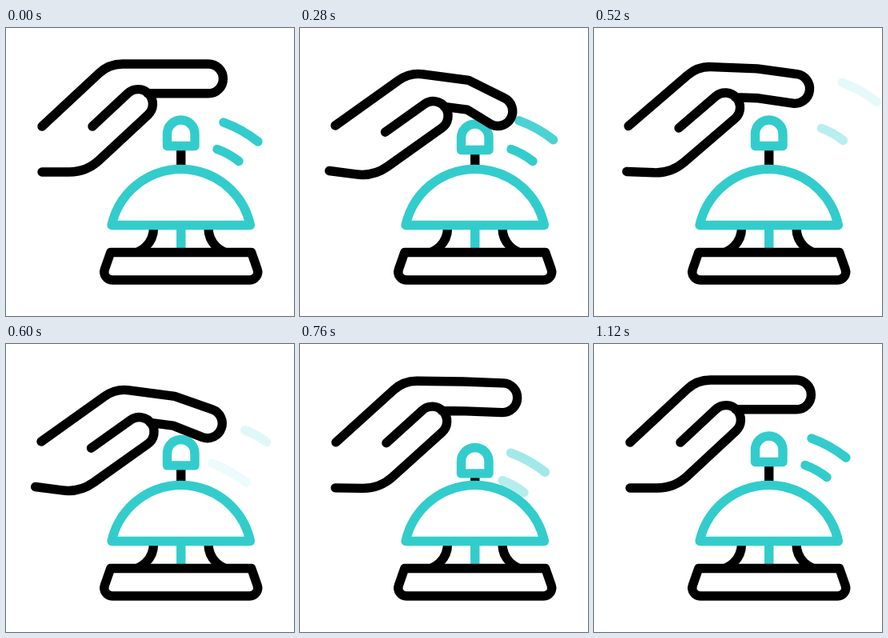
These frames come from a looping animation (360 by 360 pixels, 1.48 s). An HTML page with a canvas:

```html
<!DOCTYPE html>
<html lang="en">
<head>
<meta charset="utf-8">
<title>Reception bell</title>
<style>
  html, body { margin: 0; width: 100%; height: 100%; overflow: hidden; background: #fff; }
  canvas { display: block; width: 100vw; height: 100vh; }
</style>
</head>
<body>
<canvas id="stage" width="360" height="360"></canvas>
<script>
const LOOP = 1480, STEP = 40, START = 120, SPAN = 1000;
const TEAL = '#33cccc', BLACK = '#000', MID = 218.75;
const ctx = document.getElementById('stage').getContext('2d');

const rad = deg => deg * Math.PI / 180;
const clamp = v => Math.min(1, Math.max(0, v));
const part = (u, a, b) => clamp((u - a) / (b - a));
const smooth = s => s * s * (3 - 2 * s);
const lerp = (a, b, s) => a + (b - a) * s;

function shape(color, trace, { cap = 'butt', fill = false } = {}) {
  ctx.beginPath();
  trace();
  ctx.strokeStyle = color;
  ctx.lineCap = cap;
  if (fill) ctx.fill();
  ctx.stroke();
}

const line = (color, x, y1, y2) => shape(color, () => {
  ctx.moveTo(x, y1);
  ctx.lineTo(x, y2);
});

// Hand poses: turn about the wrist, extra bend of the fingers, wrist shift
const REST = { turn: 0, bend: 0, x: 0, y: 0 };
const PRESS = { turn: 7.5, bend: 19, x: -1, y: -1 };
const LIFT = { turn: -2.9, bend: -1, x: -2.8, y: 0 };
const TAP = { ...PRESS, bend: 12 };
const MOVES = [[0, REST], [.16, PRESS], [.32, LIFT], [.48, TAP], [.68, REST], [1, REST]];

function poseAt(u) {
  const i = Math.max(1, MOVES.findIndex(([end]) => u <= end));
  const [a, from] = MOVES[i - 1], [b, to] = MOVES[i];
  const s = smooth(part(u, a, b));
  return Object.fromEntries(Object.keys(REST).map(k => [k, lerp(from[k], to[k], s)]));
}

// Traced from the wrist, with every slanted edge at the same angle
function hand({ turn, bend, x, y }) {
  const slant = rad(43), thumbStart = -Math.PI / 2 - slant;
  ctx.save();
  ctx.translate(45 + x, 123 + y);
  ctx.rotate(rad(turn));
  shape(BLACK, () => {
    ctx.moveTo(0, 0);
    ctx.arcTo(78 / Math.tan(slant), -78, 158, -78, 43);
    ctx.lineTo(158, -78);
    ctx.save();
    ctx.translate(158, -78);
    ctx.rotate(rad(bend));
    ctx.arc(50, 18.4, 18.4, -Math.PI / 2, Math.PI / 2);
    ctx.restore();
    ctx.lineTo(161, -41.2);
    ctx.lineTo(132, -41.2);

    ctx.moveTo(63, 0);
    ctx.arc(120, -28, 18.4, thumbStart, thumbStart + Math.PI);
    ctx.arcTo(55.6, 57, 0, 57, 55);
    ctx.lineTo(0, 57);
  }, { cap: 'round' });
  ctx.restore();
}

function bell(dip) {
  line(BLACK, MID, 148 + dip, 176);
  shape(TEAL, () => {
    ctx.arc(MID, 132.3 + dip, 17.25, Math.PI, 0);
    ctx.lineTo(MID + 17.25, 147.5 + dip);
    ctx.lineTo(MID - 17.25, 147.5 + dip);
    ctx.closePath();
  }, { fill: true });

  for (const side of [-1, 1]) {
    shape(BLACK, () => ctx.arc(MID + side * 66.75, 250, 32.5,
      side < 0 ? 0 : Math.PI, Math.PI / 2, side > 0));
  }
  // Keep the feet from showing through the base
  line(TEAL, MID, 248, 278);
  shape(TEAL, () => {
    ctx.arc(MID, 265, 88.6, Math.PI + .21, -.21);
    ctx.closePath();
  }, { fill: true });
  shape(BLACK, () => {
    ctx.moveTo(MID - 88, 280.5);
    ctx.lineTo(MID + 88, 280.5);
    ctx.arcTo(MID + 100, 315, MID, 315, 10);
    ctx.arcTo(MID - 100, 315, MID - 88, 280.5, 10);
    ctx.closePath();
  }, { fill: true });
}

// A sound wave flies out and fades, then drifts back in from the bell
const WAVES = [
  { x: 272, y: 118, w: 43, h: 24, out: .12, turn: .44, end: .88, away: [40, -52], back: [-15, 32], fade: 1 },
  { x: 264, y: 151.5, w: 27, h: 15, out: .24, turn: .56, end: 1, away: [41, -52], back: [-12, 21], fade: .6 }
];

function wave({ x, y, w, h, out, turn, end, away, back, fade }, u) {
  const leaving = u < turn;
  const s = leaving ? part(u, out, turn) : part(u, turn, end);
  const k = leaving ? smooth(s) : 1 - smooth(s);
  const [dx, dy] = leaving ? away : back;
  ctx.save();
  ctx.globalAlpha = leaving ? 1 - s ** fade : s ** fade;
  ctx.translate(x + dx * k, y + dy * k);
  shape(TEAL, () => {
    ctx.moveTo(0, 0);
    ctx.quadraticCurveTo(w * .55, h * .36, w, h);
  }, { cap: 'round' });
  ctx.restore();
}

// Each tap pushes the knob down and lets it spring back
const tapDepth = (u, mid, half) => 15 * clamp((half - Math.abs(u - mid)) / .12);

function draw(now) {
  const t = Math.floor((now % LOOP) / STEP) * STEP;
  const u = clamp((t - START) / SPAN);
  ctx.fillStyle = '#fff';
  ctx.fillRect(0, 0, 360, 360);
  ctx.lineWidth = 11.4;
  ctx.lineJoin = 'round';
  WAVES.forEach(w => wave(w, u));
  bell(tapDepth(u, .24, .12) + tapDepth(u, .6, .155));
  hand(poseAt(u));
}

let begin;
function tick(now) {
  begin ??= now;
  draw(now - begin);
  requestAnimationFrame(tick);
}
draw(0);
requestAnimationFrame(tick);
</script>
</body>
</html>
```
